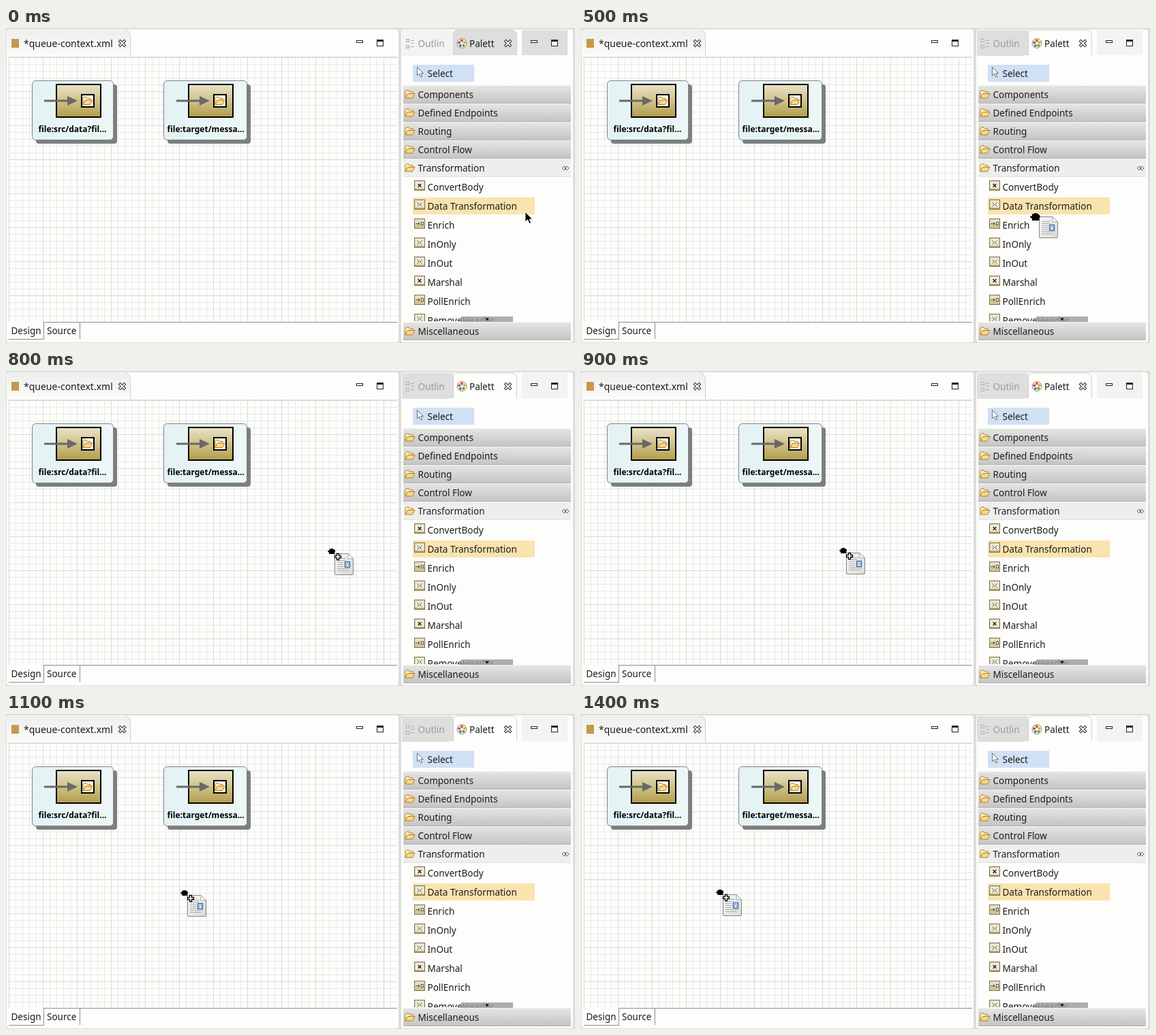
An HTML page that plays this animation: 835 by 463 pixels, repeating every 1700 ms.

```html
<!DOCTYPE html>
<html lang="en">
<head>
<meta charset="utf-8">
<title>Route editor</title>
<style>
  html, body { margin: 0; width: 100%; height: 100%; overflow: hidden; background: #dcdddb; }
  svg { display: block; width: 835px; height: 463px; }
  text { font: 13.5px "Noto Sans", "Open Sans", sans-serif; fill: #1c1c1c; white-space: pre; }
  .label { font-size: 12px; font-weight: 700; fill: #000; }
  .file { font-size: 14px; }
  .dim { fill: #9a9a9a; }
  .crisp { shape-rendering: crispEdges; }
</style>
</head>
<body>
<svg viewBox="0 0 835 463" xmlns="http://www.w3.org/2000/svg">
  <defs>
    <linearGradient id="tab" x2="0" y2="1"><stop stop-color="#eeeeed"/><stop offset="1" stop-color="#fbfbfa"/></linearGradient>
    <linearGradient id="drawer" x2="0" y2="1"><stop stop-color="#e6e6e5"/><stop offset="1" stop-color="#c3c4c2"/></linearGradient>
    <linearGradient id="olive" x2="0" y2="1"><stop stop-color="#e9e2c8"/><stop offset=".45" stop-color="#d2c590"/><stop offset="1" stop-color="#b29d4b"/></linearGradient>
    <linearGradient id="node" x2="1" y2="0"><stop stop-color="#e4f2f4"/><stop offset="1" stop-color="#eef7f7"/></linearGradient>
    <linearGradient id="paper" x2="1" y2="1"><stop stop-color="#f8f8f8"/><stop offset="1" stop-color="#d9dad8"/></linearGradient>
    <pattern id="minor" x="4" y="43" width="10" height="10" patternUnits="userSpaceOnUse">
      <path d="M.5 0V10M0 .5H10" stroke="#e8eae6"/>
    </pattern>
    <pattern id="major" x="4" y="43" width="50" height="50" patternUnits="userSpaceOnUse">
      <path d="M.5 0V50M0 .5H50" stroke="#d9dbd7"/>
    </pattern>
    <clipPath id="list"><rect x="583" y="219" width="246" height="212"/></clipPath>

    <g id="folder" stroke-linejoin="round">
      <path d="M1 12V2.500L2.500 1H6L7.500 3H12V5.500" fill="#fdf0c4" stroke="#b27a22"/>
      <path d="M1 12L4.500 5.500H15L11.500 12Z" fill="#f9d88a" stroke="#b27a22"/>
    </g>
    <g id="close">
      <path d="M1 1L10 10M10 1L1 10" stroke="#333" stroke-width="4.200"/>
      <path d="M1.600 1.600L9.400 9.400M9.400 1.600L1.600 9.400" stroke="#fff" stroke-width="2"/>
    </g>
    <g id="window" class="crisp" fill="#fff" stroke="#222">
      <rect x=".5" y="1.500" width="9" height="3"/>
      <rect x="30.500" y=".5" width="9" height="9"/>
      <path d="M30 2H40" stroke-width="2"/>
    </g>
    <g id="tile" class="crisp">
      <rect x=".5" y=".5" width="15" height="14" fill="#e6dfc0" stroke="#7b7355"/>
      <path d="M1 13H15" stroke="#b9a966" stroke-width="2"/>
    </g>
    <g id="cross">
      <use href="#tile"/><rect x="3" y="3" width="10" height="9" fill="#f8f5e6"/>
      <path d="M5.500 5L10.500 10M10.500 5L5.500 10" stroke="#222" stroke-width="1.500"/>
    </g>
    <g id="split">
      <use href="#tile"/><rect x="3" y="3" width="10" height="9" fill="#f8f5e6"/>
      <path d="M4 4L7 7M12 4L9 7M4 11L7 8M12 11L9 8" stroke="#66624c"/>
      <path d="M8 4V11M4 7.500H12" stroke="#99947a" stroke-dasharray="1 1"/>
    </g>
    <g id="merge">
      <use href="#tile"/><rect x="1" y="8" width="14" height="6" fill="#d2c590"/>
      <path d="M2 7.500H7" stroke="#666"/><path d="M6 5L9 7.500L6 10Z" fill="#666"/>
      <rect x="10.500" y="5.500" width="3" height="4" fill="#fff" stroke="#555"/>
    </g>
    <path id="arrow" d="M0 0V14.500L3.500 11.200L6 17L8.500 16L6 10.500H10.500Z"/>
    <path id="hand" d="M3 12V9.500L.3 7Q-.2 5 1.500 5L3 6V3Q4 1.300 5.500 2.500Q6 .3 8 1.500Q9.500 .3 10.500 2.500Q12.500 1.500 13 4Q14.700 3.500 14.700 6L13.500 9.500V12Z"/>
    <g id="page">
      <path d="M1.500 .5H20L27.500 8V30Q27.500 31.500 26 31.500H2Q.5 31.500 .5 30V2Q.5 .5 1.500 .5Z" fill="url(#paper)" stroke="#878987"/>
      <path d="M20 .5V8H27.500Z" fill="#fff" stroke="#a3a5a3"/>
      <path d="M4 7.500H17M4 10.500H17M4 13.500H13M4 16.500H13M4 19.500H13M4 22.500H23M4 25.500H20" stroke="#aeb0ae"/>
      <rect x="15.500" y="12.500" width="7" height="8" fill="#c4d9f2" stroke="#3769a8" stroke-width="1.300"/>
      <path d="M17.500 19V15.500H20.500V19" fill="#fff" stroke="#7399c9"/>
    </g>
  </defs>

  <g id="editor">
    <rect x="1" y="2" width="575" height="460" rx="4" fill="#fdfdfc"/>
    <path d="M2 41V6Q2 3 5 3H174Q182 3 182.500 12V41Z" fill="url(#tab)"/>
    <path d="M174 3Q182 3 182.500 12V41" fill="none" stroke="#cfd0ce"/>
    <rect x="8" y="16" width="11" height="13" fill="#c49a4a"/>
    <text class="file" x="26" y="28">*queue-context.xml</text>
    <use href="#close" x="165" y="17"/>
    <use href="#window" x="514" y="17"/>
    <g class="crisp">
      <rect x="4" y="43" width="570" height="389" fill="#fdfefb"/>
      <rect x="4" y="43" width="570" height="389" fill="url(#minor)"/>
      <rect x="4" y="43" width="570" height="389" fill="url(#major)"/>
      <path d="M2 42.500H575" stroke="#dededc"/>
      <path d="M55.500 432.500H574M55.500 432V457.500H4M108.500 433V457" fill="none" stroke="#8d8e8c"/>
    </g>
    <text x="7.500" y="450">Design</text>
    <text x="60" y="450">Source</text>
  </g>

  <g id="palette">
    <rect x="580" y="2" width="252" height="460" rx="4" fill="#fdfdfc"/>
    <path id="outline-tab" d="M581 41V6Q581 3 584 3H656V41Z"/>
    <path id="palette-tab" d="M656.500 41V10Q657 3 663 3H742Q749 3 749.500 11V41Z" stroke="#d0d1cf"/>
    <rect x="650" y="40" width="106" height="3" fill="#fdfdfc"/>
    <rect id="tab-tools" x="757" y="3" width="67" height="37"/>
    <g class="crisp" fill="#dfe9f2" stroke="#9fb0c0">
      <rect x="587.500" y="16.500" width="4" height="4"/><rect x="587.500" y="25.500" width="4" height="4"/>
      <path d="M594 18.500H599M594 22.500H599M594 27.500H599"/>
    </g>
    <text class="dim" x="604.500" y="28">Outlin</text>
    <circle cx="669" cy="22.500" r="7" fill="#fbf4df" stroke="#a28a5a"/>
    <g id="paints"></g>
    <text x="680" y="28">Palett</text>
    <use href="#close" x="731" y="17"/>
    <use href="#window" x="770" y="17"/>
    <rect x="597" y="54" width="90" height="25" fill="#d0e0f5"/>
    <use href="#arrow" transform="translate(603.500 57.500) scale(.85)" fill="#fff" stroke="#555"/>
    <text x="618.500" y="72">Select</text>
    <g id="drawers"></g>
    <path d="M819 203L816 206L819 209L822 206ZM823 203L820 206L823 209L826 206Z" fill="none" stroke="#555" stroke-width=".9"/>
    <rect x="597" y="249" width="179" height="25" fill="#f9e3af"/>
    <g id="items" clip-path="url(#list)"></g>
    <rect x="668" y="424" width="76" height="8" fill="#9d9e9c" fill-opacity=".82"/>
    <path d="M703 426.500H709L706 430Z" fill="#000"/>
  </g>

  <use id="pointer" href="#arrow" x="762" y="270.500" stroke="#fff" stroke-width=".8"/>
  <g id="drag">
    <use href="#page"/>
    <use id="grab" href="#hand" x="-13" y="-6"/>
    <g id="copy">
      <use href="#hand" transform="translate(-10 -8) scale(.76)"/>
      <path d="M3.500 .5H6.500V3.500H9.500V6.500H6.500V9.500H3.500V6.500H.5V3.500H3.500Z" fill="#fff" stroke="#000" stroke-width="1.300"/>
    </g>
  </g>
</svg>
<script>
  const $ = id => document.getElementById(id);
  const add = (id, markup) => $(id).insertAdjacentHTML('beforeend', markup);

  function addNode(x, width, iconX, textX, label) {
    add('editor', `
      <rect x="${x + 6}" y="83" width="${width - 1}" height="87" rx="4" fill="#7d7f7d"/>
      <rect x="${x + .5}" y="77.500" width="${width - 1}" height="87" rx="5" fill="url(#node)" stroke="#7d8484"/>
      <g transform="translate(${iconX} 82)">
        <rect x="1" y="1" width="65" height="48" fill="url(#olive)" stroke="#000" stroke-width="2"/>
        <path d="M-17 25H20" stroke="#686a68" stroke-width="3"/>
        <path d="M17 18L32 25L17 32Z" fill="#686a68"/>
        <rect x="38" y="16" width="18" height="18" fill="#fffdf4" stroke="#000" stroke-width="2"/>
        <use href="#folder" x="39" y="18.500"/>
      </g>
      <text class="label" x="${textX}" y="153">${label}</text>`);
  }
  addNode(38, 120, 73, 47.5, 'file:src/data?fil...');
  addNode(231, 123, 267, 236.5, 'file:target/messa...');

  function addDrawer(name, y, open) {
    add('drawers', `
      <g class="crisp">
        <rect x="583" y="${y}" width="246" height="27" fill="${open ? '#eeefed' : 'url(#drawer)'}"/>
        <path d="M583 ${y + .5}H829" stroke="#f4f4f3"/>
        <path d="M583 ${y + 26.5}H829" stroke="${open ? '#e3e4e2' : '#b3b4b2'}"/>
      </g>
      <use href="#folder" x="585" y="${y + 7}"/>
      <text x="604.500" y="${y + 19}">${name}</text>`);
  }
  ['Components', 'Defined Endpoints', 'Routing', 'Control Flow', 'Transformation']
    .forEach((name, i) => addDrawer(name, 84 + 27 * i, i === 4));
  addDrawer('Miscellaneous', 432);

  [['ConvertBody', 'cross'], ['Data Transformation', 'split'], ['Enrich', 'merge'],
   ['InOnly', 'split'], ['InOut', 'split'], ['Marshal', 'cross'],
   ['PollEnrich', 'merge'], ['RemoveHeader', 'split']].forEach(([name, icon], i) => {
    const y = 239 + 28 * i;
    add('items', `<use href="#${icon}" x="599" y="${y - 15}"/><text x="618.500" y="${y}">${name}</text>`);
  });

  ['#d94636', '#e8a12c', '#4c9f45', '#3b6fc0', '#8a4fa3'].forEach((color, i) => {
    const a = i * Math.PI * 2 / 5 - 1.6;
    add('paints', `<circle cx="${669 + 4 * Math.cos(a)}" cy="${22.5 + 4 * Math.sin(a)}" r="1.900" fill="${color}"/>`);
  });

  // Page position on each 100 ms step of the drag.
  const LOOP = 1700, START = 300, STEP = 100, CANVAS_EDGE = 575;
  const path = [
    [734, 279], [709, 278], [672, 277], [616, 275], [550, 271], [482, 268],
    [389, 267], [305, 266], [266, 266], [238, 266], [221, 265], [208, 265]
  ];
  const GREY = '#dededd', PALE = '#f3f3f2', WHITE = '#fdfdfc';
  const show = (id, on) => $(id).setAttribute('visibility', on ? 'visible' : 'hidden');
  const paint = (id, color) => $(id).setAttribute('fill', color);

  function draw() {
    const t = performance.now() % LOOP;
    const dragging = t >= START;
    const step = Math.min(path.length - 1, Math.max(0, Math.floor((t - START) / STEP)));
    const [x, y] = path[step];
    const overCanvas = x < CANVAS_EDGE;
    $('drag').setAttribute('transform', `translate(${x} ${y})`);
    $('drag').style.display = dragging ? '' : 'none';
    show('pointer', !dragging);
    show('grab', !overCanvas);
    show('copy', overCanvas);
    // The palette takes the focus when the drag begins.
    paint('outline-tab', dragging ? GREY : PALE);
    paint('palette-tab', dragging ? WHITE : GREY);
    paint('tab-tools', dragging ? PALE : GREY);
    requestAnimationFrame(draw);
  }
  draw();
</script>
</body>
</html>
```
